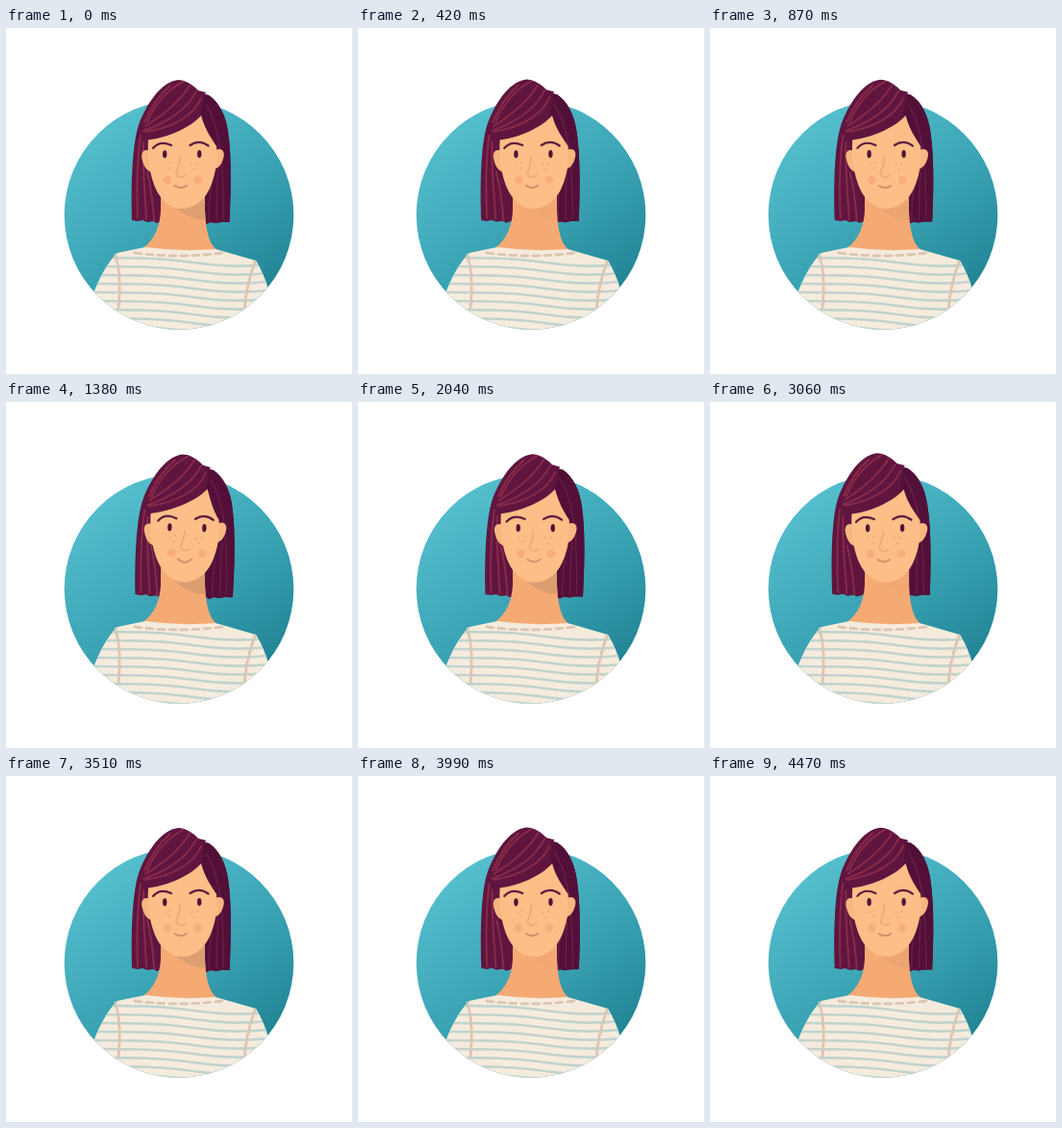
These frames come from a looping animation (360x360 px, 4.5 s). An HTML page:

```html
<!DOCTYPE html>
<html lang="en">
<head>
<meta charset="utf-8">
<title>Portrait</title>
<style>
html, body { margin: 0; width: 100%; height: 100%; overflow: hidden; background: #fff; }
svg { display: block; width: 100vw; height: 100vh; }
.line { fill: none; stroke-linecap: round; stroke-linejoin: round; }
</style>
</head>
<body>
<svg viewBox="0 0 360 360">
  <defs>
    <linearGradient id="teal" gradientUnits="userSpaceOnUse" x1="115" y1="95" x2="245" y2="295">
      <stop offset="0" stop-color="#54becd"/>
      <stop offset=".5" stop-color="#3ba5b6"/>
      <stop offset="1" stop-color="#218394"/>
    </linearGradient>
    <clipPath id="disc"><circle cx="180" cy="194.5" r="119.3"/></clipPath>
    <clipPath id="shirt"><path id="shirtShape" d="M145 228Q181 233 218 230L260 242C266 252 270 261 273 272L286 320H80L91 276C97 261 105 244 116 234Q130 231 145 228Z"/></clipPath>
    <clipPath id="neckClip"><path id="neckShape" d="M161 172V190C160 208 154 220 143 228.5Q180 236 219 230.5C211 224 208 211 207 190V172Z"/></clipPath>
  </defs>

  <circle cx="180" cy="194.5" r="119.3" fill="url(#teal)"/>

  <g id="hair">
    <path fill="#60153f" d="M179 54C160 56 145 82 138 101C131 122 130 165 131 200L137 201L142 200L147 202L153 201L157 203L163 201H203L208 204L213 202L218 203L224 202L232.5 202C234 172 235 135 231 108C229 92 222 77 211 70L207 69L208 67L200 65L197 62C191 57 185 54 179 54Z"/>
    <path fill="#521039" d="M207 69L211 70C222 77 229 92 231 108C235 135 234 172 232.5 202L224 202L218 203L213 202L208 204L203 201V150L203 90Z"/>
    <g class="line" stroke="#872a48" stroke-width="2">
      <path d="M184 56C167 65 154 81 147 98"/>
      <path d="M191 60C180 78 163 91 145 102"/>
      <path d="M198 66C187 87 166 99 143 107"/>
      <path d="M203 73C195 92 172 104 145 108"/>
      <path d="M171 60C158 71 149 86 144 98"/>
      <path d="M140 112C136 140 136 170 137 198"/>
      <path d="M143 119C142 150 145 175 146 199"/>
      <path d="M147 150C151 166 153 184 154 200"/>
    </g>
    <g class="line" stroke="#6a1d42" stroke-width="1.5">
      <path d="M208 80C219 96 227 126 226 199"/>
      <path d="M221 146C219 166 219 184 219 200"/>
      <path d="M214 164C211 178 211 190 211 201"/>
    </g>
  </g>

  <g clip-path="url(#disc)">
    <use href="#neckShape" fill="#f5aa73"/>
    <g clip-path="url(#neckClip)">
      <path id="shade" fill="#d99d70" d="M174 184L208 170V200C195 200 183 194 174 184Z"/>
    </g>
    <use href="#shirtShape" fill="#f5ebdd"/>
    <g id="stripes" class="line" clip-path="url(#shirt)" stroke="#c0d3cd" stroke-width="2.7"></g>
    <g class="line" stroke="#dbc6b2" stroke-width="2.8">
      <path stroke-dasharray="7 5" d="M134 234Q180 240 225 234"/>
      <path d="M114 236C119 254 119 274 117 292"/>
      <path d="M259 243C253 260 249 276 248 294"/>
    </g>
  </g>

  <g id="head">
    <g fill="#f9b680">
      <path d="M150 128C143 125 139.5 130 142 138C144 146 148 150 153 150Z"/>
      <path d="M218 127C225 124 228.5 129 226 136C224 143 220 147 215 147Z"/>
    </g>
    <path id="skin" fill="#fdbe87"/>
    <g id="features">
      <g class="line" stroke="#5b1b40" stroke-width="2.2">
        <path d="M153 125Q160 116.5 172 122"/>
        <path d="M191.5 122Q201 115.5 210.5 122.5"/>
      </g>
      <g fill="#521338">
        <ellipse cx="165.2" cy="131.3" rx="2.2" ry="4.1"/>
        <ellipse cx="201.2" cy="131.1" rx="2.2" ry="4.1"/>
      </g>
      <g fill="#f7ad7d">
        <circle cx="168" cy="158" r="4.3"/>
        <circle cx="199.7" cy="158" r="4.3"/>
      </g>
      <g id="freckles" fill="#eea472"></g>
      <path class="line" stroke="#eea674" stroke-width="1.4" d="M181 134C181 142 178 148 177 152Q181 158 187 153"/>
      <path id="mouth" class="line" stroke="#d28e6c" stroke-width="1.8"/>
    </g>
  </g>
</svg>
<script>
const LOOP = 4500, SWAY = 3600, STEP = 30;
const $ = id => document.getElementById(id);

// [ms, hair shift, face turn]
const keys = [
  [0, 0, 0], [500, -3.7, -.8], [870, -1.6, .4], [1380, 4.2, 5], [1680, 4, 4.6],
  [2040, 1.8, 1.5], [2600, -4.4, -1.2], [3060, -4.6, -1.1], [3510, .1, 0]
];

function key(i) {
  const n = keys.length, k = keys[(i + n) % n];
  return [k[0] + Math.floor(i / n) * SWAY, k[1], k[2]];
}

// Smooth curve through the looping keys
function sample(t, col) {
  let i = keys.length - 1;
  while (keys[i][0] > t) i--;
  const [a, b, c, d] = [-1, 0, 1, 2].map(o => key(i + o));
  const span = c[0] - b[0], u = (t - b[0]) / span;
  const m0 = (c[col] - a[col]) / (c[0] - a[0]) * span;
  const m1 = (d[col] - b[col]) / (d[0] - b[0]) * span;
  const u2 = u * u, u3 = u2 * u;
  return (2 * u3 - 3 * u2 + 1) * b[col] + (u3 - 2 * u2 + u) * m0 +
    (3 * u2 - 2 * u3) * c[col] + (u3 - u2) * m1;
}

let bands = "";
for (let i = 0; i < 9; i++) {
  const y = 239 + i * 9;
  bands += `<path d="M80 ${y}C115 ${y} 145 ${y} 168 ${y + 2}S210 ${y + 8} 235 ${y + 8.5}S270 ${y + 7} 285 ${y + 6}"/>`;
}
$("stripes").innerHTML = bands;

$("freckles").innerHTML = [[166, 142], [171, 140], [170, 146], [193, 142], [199, 141], [196, 147]]
  .map(([x, y]) => `<circle cx="${x}" cy="${y}" r="1"/>`).join("");

function draw(now) {
  const t = Math.floor(now % LOOP / STEP) * STEP % SWAY;
  const hair = sample(t, 1), turn = sample(t, 2);
  const smile = Math.max(0, turn / 5), tip = 203 + turn * .8;

  $("hair").setAttribute("transform", `translate(${hair} ${hair * .15}) rotate(${hair * .15} 182 130)`);
  $("head").setAttribute("transform", `translate(${turn * .5} ${-smile * .5})`);
  $("features").setAttribute("transform", `translate(${turn * .5} 0) rotate(${smile * 1.8} 183 135)`);
  $("skin").setAttribute("d", `M148 116.5C164 115 ${tip - 12} 105 ${tip} 91C${tip + 4} 106 214 115 219 123` +
    "C220 140 218 151 214 162C208 179 196 188 183 188C169 188 158 176 153 160C149 148 147 132 148 116.5Z");
  $("mouth").setAttribute("d", `M${175.5 - smile} 164Q${182 + smile * .5} ${168.5 + smile * 2} ${188 + smile} 164`);
  $("shade").setAttribute("opacity", Math.min(.9, Math.max(.15, .8 + hair * .25)));
}

function frame(now) {
  draw(now);
  requestAnimationFrame(frame);
}
draw(0);
requestAnimationFrame(frame);
</script>
</body>
</html>
```
